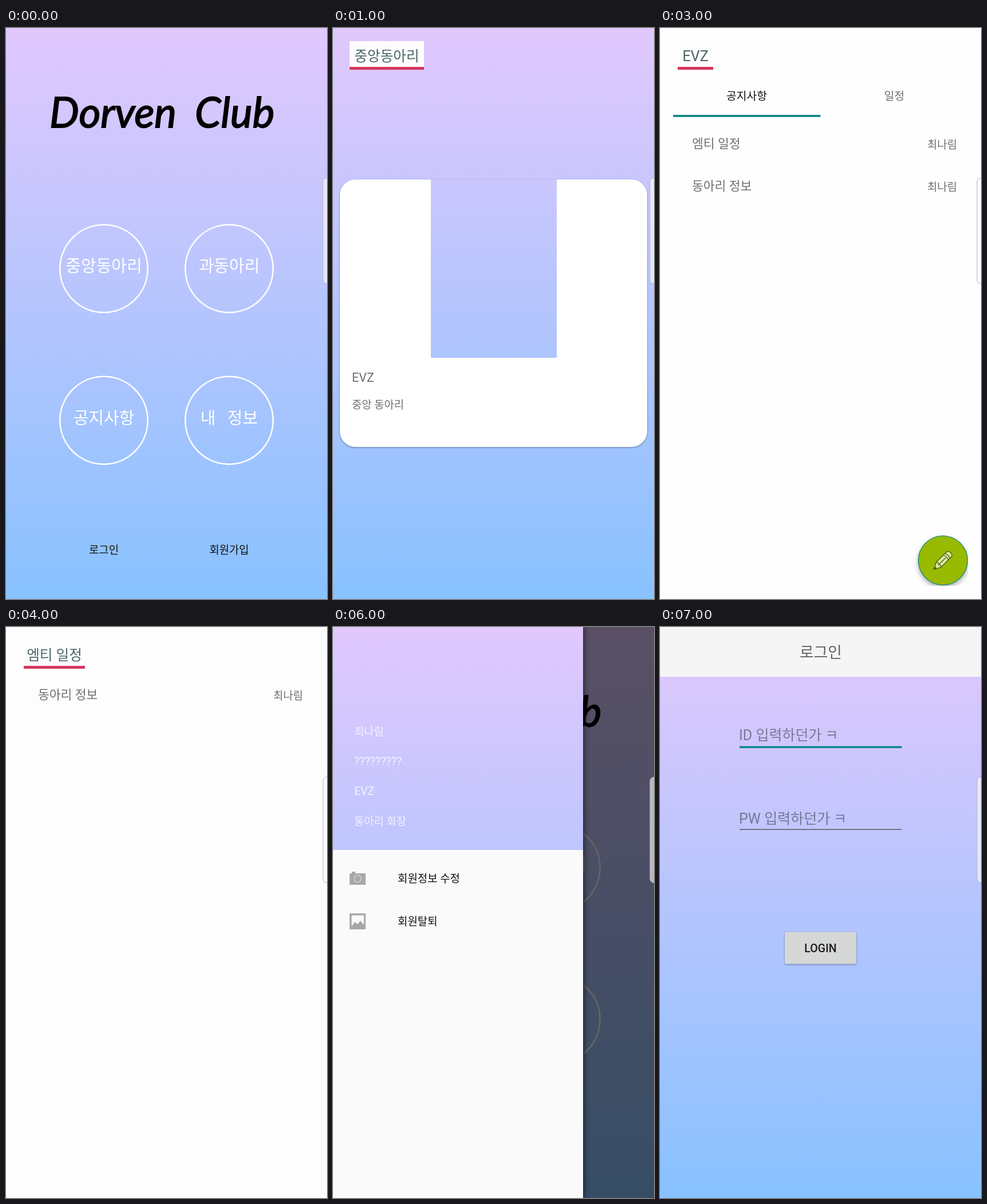
An HTML page for the animation above (8000 ms loop, 561 by 999 pixels).

```html
<!DOCTYPE html>
<html lang="ko">
<head>
<meta charset="utf-8">
<style>
  html, body { margin: 0; width: 100%; height: 100%; overflow: hidden; background: #fafafa; }
  svg { display: block; width: 561px; height: 999px; font-family: Roboto, "Noto Sans CJK KR", sans-serif; }
  .card { filter: drop-shadow(0 1px 1.5px #0006); }
  .script { font-family: Lato, "Noto Sans CJK KR", sans-serif; }
  .poster { font-family: "Noto Sans CJK KR", sans-serif; }
</style>
</head>
<body>
<svg id="stage" viewBox="0 0 561 999">
  <defs>
    <linearGradient id="sky" gradientUnits="userSpaceOnUse" x1="0" y1="0" x2="0" y2="999">
      <stop stop-color="#e1c8fd"/><stop offset="1" stop-color="#88c2ff"/>
    </linearGradient>
    <clipPath id="fabClip"><path d="M440 880H538V976H440z"/></clipPath>
    <g id="dumbbell" fill="#b9b9bd">
      <path d="M-14-2H14V2H-14z" fill="#8d8d92"/>
      <rect x="-14" y="-10" width="7" height="20" rx="3" fill="#98989d"/>
      <rect x="7" y="-10" width="7" height="20" rx="3" fill="#98989d"/>
      <ellipse cx="-12.500" rx="5" ry="9.500"/><ellipse cx="12.500" rx="5" ry="9.500"/>
      <rect x="-5" y="-5" width="10" height="10" rx="4" fill="#f0c49c"/>
    </g>
  </defs>
</svg>
<script>
const stage = document.getElementById('stage');
const GREY = '#6e6e6e', TITLE = '#4a6468', TEAL = '#008580', BLUE = '#4a85f0';
const CLUB = 'EVZ', USER = '최나림', ADMIN = 'moru';

// Hangul is set a little heavier than Latin.
const text = (x, y, size, str, fill = GREY, attrs = '') =>
  `<text x="${x}" y="${y}" font-size="${size}" fill="${fill}" ${/^[가-힣]/.test(str) ? 'font-weight="500"' : ''} ${attrs}>${str}</text>`;
const rect = (x, y, w, h, fill, attrs = '') =>
  `<rect x="${x}" y="${y}" width="${w}" height="${h}" fill="${fill}" ${attrs}/>`;
const MID = 'text-anchor="middle"', END = 'text-anchor="end"';

const plain = color => rect(0, 0, 561, 999, color);
const sky = plain('url(#sky)');
const header = (x, y, w, str, size = 24.6) =>
  rect(x, y, w, 45, '#fdfdfd') + rect(x, y + 45, w, 5, '#d6365f') +
  text(x + w / 2, y + 35, size, str, TITLE, MID);
const row = (x, right, y, title, author) =>
  text(x, y, 21.5, title) + text(right, y + 1, author === ADMIN ? 20 : 18.8, author, GREY, END);

const circleButton = (x, y, label) =>
  `<circle cx="${x}" cy="${y}" r="76.7" fill="none" stroke="#fff" stroke-width="2.6"/>` +
  text(x, y + 6, 29, label, '#fff', MID + ' word-spacing="13"');
const ink = 'class="script" font-style="italic" stroke="#000" stroke-width="1.8"';
const home = sky +
  text(76, 174, 73, 'Dorven', '#000', ink) + text(330, 174, 73, 'Club', '#000', ink) +
  circleButton(171, 421, '중앙동아리') + circleButton(390, 421, '과동아리') +
  circleButton(171, 686.5, '공지사항') + circleButton(390, 686.5, '내 정보') +
  text(171, 920, 18.8, '로그인', '#111', MID) + text(390, 920, 18.8, '회원가입', '#111', MID);

const card = (picture, name, note) =>
  rect(12, 265, 537, 468, '#fff', 'rx="27" class="card"') + picture +
  text(33, 619, 21.5, name) + text(33, 666, 18.8, note);

const woman = `
  <path d="M269 446q15 2 12 25q-7-6-12-14z" fill="#453636"/>
  <path d="M243 493q-12 20-14 29q-9-6-10-25l-8-1q-2 36 18 41q12-10 20-30z" fill="#f2c9a5"/>
  <path d="M272 490q12 4 25 31q-3 17-26 27l-4-8q13-9 17-18l-15-17z" fill="#f2c9a5"/>
  <path d="M252 472h13v16l7 6l-2 48l4 10h-35l5-12l-3-44l10-8z" fill="#f2c9a5"/>
  <path d="M243 490q1 11 11 13q10-1 13-14l6 6q2 25-2 45h-28q1-28-5-40z" fill="#df6886"/>
  <path d="M240 549h32l4 11h-38z" fill="#2c2d35"/>
  <ellipse cx="257" cy="467" rx="12" ry="17" fill="#f7d4b4"/>
  <path d="M244 478q-4-33 17-33q16 3 11 24q-3 10-6 13q2-17-5-26q-12 3-17 22z" fill="#453636"/>
  <use href="#dumbbell" x="221" y="492"/>`;
const man = `
  <path d="M315 476q17 5 22 18q8-3 3-28l10-1q8 29-1 38q-13 9-32-4z" fill="#eab588"/>
  <path d="M290 462h17v14q-8 8-17 0z" fill="#dda577"/>
  <path d="M290 473q9 7 18 0q16 2 17 17q-5 21-5 46h-37l-11-44q3-16 18-19z" fill="#e4853c"/>
  <path d="M281 534h38l1 26h-45z" fill="#273248"/>
  <ellipse cx="298.5" cy="454" rx="13" ry="17" fill="#f2c49b"/>
  <path d="M284 455q-4-22 13-23q9 2 18 1q-1 7-3 8l0 15l-3-8q-12 0-20-5q-4 5-5 12z" fill="#25262d"/>
  <use href="#dumbbell" transform="translate(337 464) rotate(-4) scale(1.28)"/>`;
const slogans = ['혼자 하는 운동이 지치고 재미없다 하시는 분들!!',
  '운동을 잘 몰라 PT를 고민하는 헬린이 분들!!', '운동만? NO!! 친목까지 둘 다 누리고 싶은 분들!!'];
const headline = `font-weight="700" stroke="${BLUE}" stroke-width=".9" stroke-linejoin="round"`;
const poster = `<g class="poster">` +
  rect(171, 265, 220, 312, BLUE) + rect(184, 275, 194, 285, '#fcfcfa') +
  text(194, 317, 34, 'DORVEN', BLUE, headline) +
  text(194, 347, 34, 'HEALTH', BLUE, headline + ' letter-spacing="-2"') +
  `<circle cx="341" cy="334" r="11" fill="${BLUE}"/>` + rect(184, 355.5, 150, .8, '#bbb') +
  [[243, 372, 37], [272, 387, 32], [197, 403, 32]].map(([x, y, w]) => rect(x, y, w, 2.5, '#f7d978')).join('') +
  slogans.map((s, i) => text(197, 373.5 + i * 15.6, 6.4, s, '#6280b8')).join('') +
  rect(184, 420, 102, 13, BLUE) +
  text(197, 430.3, 10, 'FIND YOUR BODY!', '#fff', 'font-weight="700" font-style="italic"') +
  man + woman +
  text(198, 571, 6, '회장 최나림 010-0000-0000', '#c9dcff') + rect(279, 564, .7, 10, '#a9c6fa') +
  text(285, 571, 6, '부회장 한보늬 010-0000-0000', '#c9dcff') + '</g>';

const centralClubs = sky + header(29, 23, 130, '중앙동아리') +
  card(rect(171, 265, 220, 312, 'url(#sky)'), CLUB, '중앙 동아리');
const majorClubs = sky + header(29, 23, 107, '과동아리') + card(poster, '두온헬스회', '헬스 동아리');

const pencil = `
  <g transform="translate(479 947) rotate(-45)" fill="#dce8a0" stroke="#4d5a12" stroke-width="1.3" stroke-linejoin="round">
    <path d="M0 0L11-6H36q5 0 5 6t-5 6H11z"/>
    <path d="M11-6q4 3 0 6q4 3 0 6M11 0H29M29-6q3 6 0 12M33-6q3 6 0 12" fill="none"/>
    <path d="M0 0L4-2V2z" fill="#4d5a12"/>
  </g>`;
const fab = `<g clip-path="url(#fabClip)">
  <circle cx="494.5" cy="931.5" r="43" fill="#98ba00" stroke="${TEAL}" stroke-width="1.2"
    style="filter:drop-shadow(0 4px 4px #0005)"/></g>` + pencil;
const club = plain('#fefefe') + header(31, 23, 62, CLUB, 25.3) +
  text(151.5, 126, 19.3, '공지사항', '#111', MID) + text(409.5, 126, 19.3, '일정', GREY, MID) +
  rect(23, 152, 257.5, 3.6, TEAL) +
  row(56, 519, 210, '엠티 일정', USER) + row(56, 519, 283.5, '동아리 정보', USER) + fab;

const post = plain('#fdfdfd') + header(31, 23, 107, '엠티 일정') + row(56, 519, 126, '동아리 정보', USER);

const notices = plain('#fafafa') + header(8, 0, 106.5, '공지사항') +
  ['동아리 어플 사용 방법', '동아리 해본 적이 없는데....', '여긴 나만 쓸수 있어']
    .map((s, i) => row(33, 543, 112 + i * 73.5, s, ADMIN)).join('');

const drawer = home + rect(0, 0, 561, 999, '#000', 'opacity=".6"') +
  rect(0, 0, 437, 999, '#fafafa', 'style="filter:drop-shadow(2px 0 5px #0008)"') +
  rect(0, 0, 437, 390, 'url(#sky)') +
  [USER, '?????????', CLUB, '동아리 회장']
    .map((s, i) => text(37, 190 + i * 52.2, i % 3 ? 19.6 : 18.8, s, '#fffc')).join('') +
  `<path d="M29 431h4v-3h6v3h18v20H29z" fill="#a8a8a8"/>
   <circle cx="43" cy="440.5" r="6" fill="none" stroke="#ddd" stroke-width="1.2"/>
   <path d="M29 501H57V529H29zM32.5 504.5V524L38 516L43 520L48 514L54 521V504.5z" fill="#a8a8a8" fill-rule="evenodd"/>` +
  text(113, 447, 18.9, '회원정보 수정', '#111') + text(113, 522, 18.9, '회원탈퇴', '#111');

const login = sky + rect(0, 0, 561, 87, '#f5f5f5') + text(281, 54, 26.8, '로그인', '#626262', MID) +
  text(138, 198, 25, 'ID 입력하던가 ㅋ', '#0006') + rect(139, 208.5, 283.5, 3.3, TEAL) +
  text(138, 343.5, 25, 'PW 입력하던가 ㅋ', '#0006') + rect(139, 353.5, 283.5, 1.5, '#5a5a66') +
  rect(218, 533.5, 125, 56, '#d6d7d7', 'rx="3" class="card"') +
  text(280.5, 569, 19.6, 'LOGIN', '#1c1c1c', MID + ' font-weight="500"');

const scenes = [home, centralClubs, majorClubs, club, post, notices, drawer, login];
const edgeHandle = rect(554, 262.5, 20, 185, '#fff9', 'rx="7" stroke="#b4b4bc"');
stage.insertAdjacentHTML('beforeend', scenes.map(s => `<g class="scene">${s}</g>`).join('') + edgeHandle);

const layers = stage.querySelectorAll('.scene');
const start = performance.now();
function draw() {
  const current = Math.floor((performance.now() - start) / 1000) % scenes.length;
  layers.forEach((layer, i) => layer.style.display = i === current ? '' : 'none');
  requestAnimationFrame(draw);
}
draw();
</script>
</body>
</html>
```
